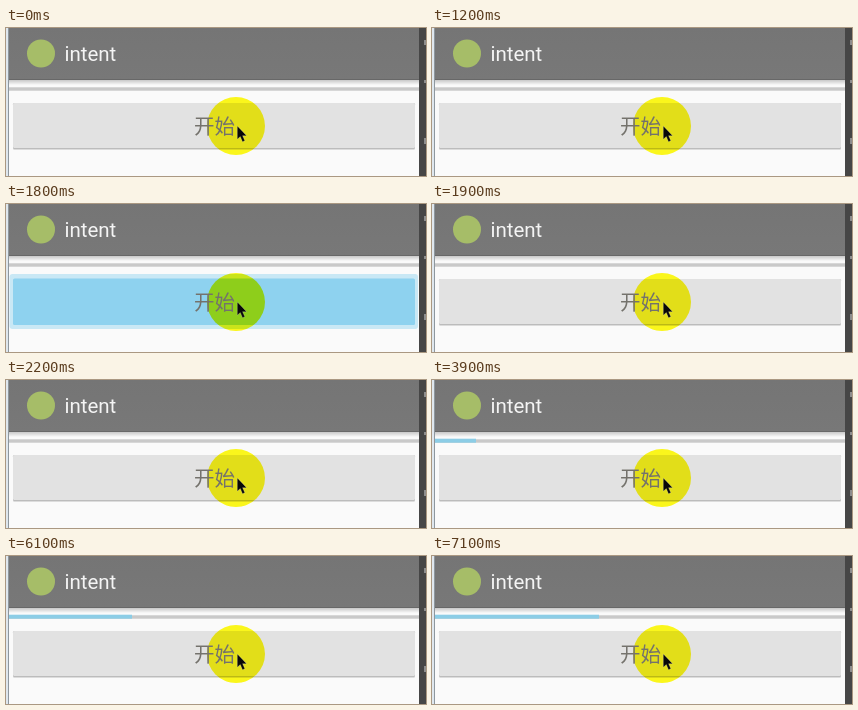
These frames come from a looping animation (420x148 px, 8000 ms). An HTML page:

```html
<!DOCTYPE html>
<html lang="zh">
<head>
<meta charset="utf-8">
<title>intent</title>
<style>
html, body { margin: 0; width: 100%; height: 100%; overflow: hidden; background: #fafafa; }
svg { display: block; width: 100vw; height: 100vh; }
.title { font: 20.5px Roboto, sans-serif; fill: #f4f4f4; }
.label { font: 20.5px "Noto Sans CJK SC", "Noto Sans CJK", sans-serif; fill: #74726c; }
.halo { mix-blend-mode: multiply; }
</style>
</head>
<body>
<svg viewBox="0 0 420 148">
  <defs>
    <linearGradient id="bar" x2="0" y2="1">
      <stop offset="0" stop-color="#757575"/>
      <stop offset="1" stop-color="#787878"/>
    </linearGradient>
    <linearGradient id="shade" x2="0" y2="1">
      <stop offset="0" stop-color="#c8c8c8"/>
      <stop offset="1" stop-color="#fafafa"/>
    </linearGradient>
  </defs>
  <rect width="420" height="148" fill="#fafafa"/>
  <rect width="414" height="52" fill="url(#bar)"/>
  <rect y="51" width="414" height="1" fill="#686868"/>
  <rect y="52" width="414" height="5" fill="url(#shade)"/>
  <circle cx="35" cy="25.5" r="14" fill="#a6bd68"/>
  <text class="title" x="58.4" y="32.5">intent</text>

  <rect x="3" y="59.3" width="410" height="3.4" fill="#c9c9c9"/>
  <rect id="fill" x="3" y="58.7" width="0" height="4" fill="#8ccde6"/>

  <g id="idle">
    <rect x="7" y="75" width="402" height="47" rx="1.5" fill="#dcdcdc"/>
    <rect x="7" y="75" width="402" height="46" rx="1.5" fill="#bcbcbc"/>
    <rect x="7" y="75" width="402" height="45" rx="1.5" fill="#e2e2e2"/>
  </g>
  <g id="pressed">
    <rect x="3.5" y="70" width="408.5" height="55" rx="3" fill="#c9e8f5"/>
    <rect x="7" y="74.5" width="402" height="46.5" rx="1.5" fill="#8ed2ef"/>
  </g>

  <rect width="2" height="148" fill="#dfe7ee"/>
  <rect x="2" width="1" height="148" fill="#8e979e"/>
  <rect x="413" width="7" height="148" fill="#464646"/>
  <path d="M419 12v5M419 52v3M419 110v6" stroke="#a0a0a0" stroke-width="1.6"/>

  <circle class="halo" cx="230" cy="98" r="29" fill="#fffb1c"/>
  <text class="label" x="188" y="106">开始</text>
  <path d="M231.3 98v13.2l3-2.7 2.2 5.2 2.3-1-2.2-5h4z" fill="#080808" stroke="#fff" stroke-opacity=".35" stroke-width=".6"/>
</svg>
<script>
const LOOP = 8000, STEP = 41;
const ticks = [3900, 5000, 6100, 7100];
const press = { from: 1500, to: 1900 };
const [fill, idle, pressed] = ["fill", "idle", "pressed"].map(id => document.getElementById(id));
const show = (el, on) => el.setAttribute("visibility", on ? "visible" : "hidden");

function draw(t) {
  const down = t >= press.from && t < press.to;
  show(pressed, down);
  show(idle, !down);
  fill.setAttribute("width", STEP * ticks.filter(at => t >= at).length);
}

const start = performance.now();
function loop() {
  draw((performance.now() - start) % LOOP);
  requestAnimationFrame(loop);
}
loop();
</script>
</body>
</html>
```
